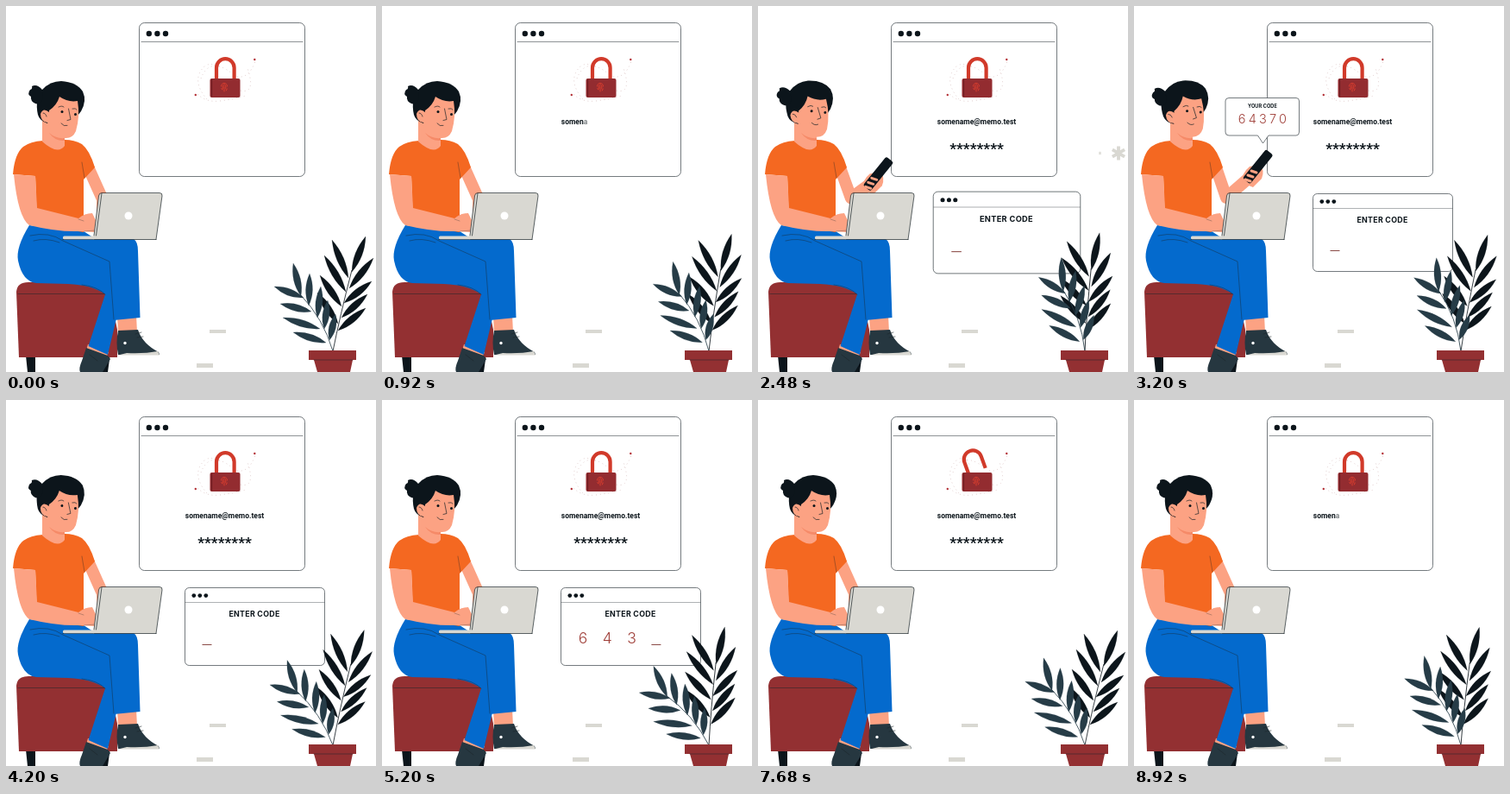
These frames come from a looping animation (429 by 424 pixels, 8960 ms). An HTML page:

```html
<!DOCTYPE html>
<html lang="en">
<head>
<meta charset="utf-8">
<title>Two-step sign-in</title>
<style>
html, body { margin: 0; width: 100%; height: 100%; overflow: hidden; background: #fff; }
svg { display: block; width: 100vw; height: 100vh; }
text { text-anchor: middle; }
.line { fill: none; stroke: #1b2429; stroke-width: .7; stroke-linecap: round; stroke-linejoin: round; }
.panel { fill: #fff; stroke: #3a4348; stroke-width: .7; }
.ink { fill: #0c151b; }
.skin { fill: #fca283; }
.shirt { fill: #f46821; }
.jeans { fill: #046acd; }
.maroon { fill: #933032; }
.grey { fill: #d9d8d2; }
.shoe { fill: #263740; }
.bold { font-family: Inter, sans-serif; font-weight: 700; fill: #0c151b; }
.digits { font-family: Inter, sans-serif; font-weight: 300; fill: #a0403a; }
.login { font-family: Roboto, sans-serif; font-weight: 700; fill: #0c151b; }
</style>
</head>
<body>
<svg viewBox="0 0 429 424" preserveAspectRatio="none">
  <!-- floor marks -->
  <path class="grey" d="M236 375h19v4h-19zM221 414h19v5h-19z"/>

  <!-- browser window -->
  <rect class="panel" x="154.5" y="19.5" width="192" height="178" rx="6"/>
  <path class="line" d="M157 41.5H344" stroke-opacity=".7"/>
  <g class="ink"><circle cx="165.8" cy="32" r="3.2"/><circle cx="175.4" cy="32" r="3.2"/><circle cx="185" cy="32" r="3.2"/></g>
  <path fill="none" stroke="#b98a8a" stroke-width=".6" stroke-dasharray=".7 4" d="M233 108Q214 86 230 70Q242 62 246 78M268 82Q282 84 289 64M272 98Q290 102 280 72M222 102Q232 112 248 110T278 104M226 84Q236 58 262 78"/>
  <g fill="#b5343a"><circle cx="288.3" cy="62" r="1.2"/><circle cx="219.8" cy="103" r="1.2"/></g>
  <path id="shackle" fill="none" stroke="#d13a2a" stroke-width="4.2" d="M244 86V71.500a10.300 10.300 0 0 1 20.600 0V86"/>
  <rect x="236.500" y="84" width="35" height="22" rx="2" fill="#932c30"/>
  <path fill="none" stroke="#64181e" stroke-width=".9" d="M238.600 85V105"/>
  <path fill="none" stroke="#e0402f" stroke-width=".9" stroke-linecap="round" d="M249.500 93c0-5 7-5 7 0M251.300 96v-3c0-2.600 3.500-2.600 3.500 0v3M253 93v6M249.800 95.500l1 1.500M256.300 96l-1 2"/>
  <g id="login">
    <text id="mail" class="login" x="253.500" y="137" font-size="8.500"></text>
    <text id="pass" class="login" x="253.500" y="170.800" font-size="17.300"></text>
  </g>
  <g id="stars" fill="none" stroke="#d9d8d2" stroke-width="4.300"></g>

  <!-- code entry window -->
  <g id="entry">
    <rect class="panel" x="207.500" y="217.500" width="162" height="90" rx="5"/>
    <path class="line" d="M208 234.500H369" stroke-opacity=".5"/>
    <g class="ink"><circle cx="217.800" cy="226.600" r="2.400"/><circle cx="224.800" cy="226.600" r="2.400"/><circle cx="231.800" cy="226.600" r="2.400"/></g>
    <text class="bold" x="288" y="250.700" font-size="8.800" letter-spacing=".3">ENTER CODE</text>
    <g id="slots" class="digits" font-size="17.500"></g>
    <path id="caret" stroke="#8a4a46" d="M-5.500 283.500h11"/>
  </g>

  <!-- stool -->
  <path class="ink" d="M23 405h11v19h-9zM108 402h13l-3 22h-8z"/>
  <path class="maroon" d="M12 331Q13 320 26 320H118L129 375V407H15Z"/>
  <path class="line" d="M14 333.500H114" stroke-opacity=".7"/>

  <!-- legs and shoes -->
  <path class="skin" d="M95 392L119 401L114 412L92 402ZM129 358H151L152 378L130 380Z"/>
  <path class="shoe" d="M93 396L118 405L121 409L112 424H86Q84 420 88 411ZM130 376L153 375Q158 391 177 401L178 404H130Q127 390 130 376Z"/>
  <path class="grey" d="M140 402Q160 403 176 400L178 404.500H130Z"/>
  <path class="line" d="M150 380l7-2M152 384l7-1M97 404l9 7" stroke-opacity=".8"/>
  <circle cx="138" cy="390.500" r="1.700" fill="#fff"/>
  <path class="jeans" d="M27 254L90 261L104 270H148Q153 273 153 284L155.500 361L125 364L124 330L128 362L118 404L95.500 394L115 334Q100 323 72 322L35 321Q19 319 14 295Q11 280 27 254Z"/>
  <path class="line" stroke-opacity=".6" d="M28 266Q50 261 66 272L120 296L125 363M32 272Q46 268 62 274M115 334Q106 325 88 323"/>

  <!-- far arm and phone -->
  <path id="arm" fill="none" stroke="#fca283" stroke-width="14" stroke-linejoin="round" stroke-linecap="round"/>
  <g id="phone">
    <path class="skin" d="M-13 13Q-15 2-5-6L7-8Q13-2 9 8L-1 18Z"/>
    <rect x="-5.500" y="-29" width="11" height="43" rx="2.500" transform="rotate(39)" fill="#0c151b"/>
    <path fill="none" stroke="#fca283" stroke-width="3" stroke-linecap="round" d="M-7 4l6 2M-3-1l6 2M-10 9l6 2"/>
  </g>

  <!-- torso -->
  <path class="shirt" d="M43 156Q28 157 20 163Q10 171 8 195L34 197L36 254L90 262V201L103 187Q97 167 88 160Q79 155 68 155Z"/>
  <path class="line" d="M88 181L91 199" stroke-opacity=".5"/>
  <path class="skin" d="M42 130L68 145V162Q60 173 42 157Z"/>
  <path fill="#f58a68" d="M50 147Q58 154 68 153V156Q57 157 50 147Z"/>

  <!-- head -->
  <g id="head">
    <path class="ink" d="M37 126Q33 108 42 97Q51 87 64 87Q82 88 89 99Q94 110 87 122L83 127L48 136Q39 133 37 126Z"/>
    <path class="ink" d="M42 97Q36 90 30 93Q31 96 28 97Q24 102 29 105Q28 110 34 113Q40 115 43 107Z"/>
    <path class="skin" d="M50 121Q59 115 62 105Q72 112 83 110Q86 128 81 145Q77 154 68 153Q54 150 48 135Q40 134 40 125Q43 117 50 123Z"/>
    <path class="line" d="M61 117q4-2 6 0M77 119q4-1 5 1M72.500 119L75 131.500l-4 1M64 136q3 4 7 2.500M43 124q3 0 4 4"/>
    <circle class="ink" cx="65" cy="122.500" r="1.500"/><circle class="ink" cx="80.500" cy="125.500" r="1.500"/>
  </g>

  <!-- near arm and laptop -->
  <path class="skin" d="M9 195L34 197L36 234L84 246Q91 240 100 240L105 250L103 262L86 261Q60 262 27 254Q14 245 9 195Z"/>
  <path class="line" stroke-opacity=".4" d="M84 247L90 249M91 261L103 260"/>
  <path class="grey" d="M111 217H179Q181.500 217 181 220L174 270.500H101L107.500 220Q108 217 111 217Z"/>
  <path class="line" d="M174 270.500L181 220Q181.500 216.500 178 216.500H111Q108 216.500 107.500 220L102 266M111 217L104.500 266M66 270.500H174"/>
  <rect class="grey" x="66" y="266.500" width="37" height="3.800" rx="1.500"/>
  <circle cx="142" cy="243" r="4.500" fill="#fff"/>

  <!-- message bubble -->
  <g id="bubble">
    <path class="panel" d="M110 106.500H188Q191.500 106.500 191.500 110V146Q191.500 150 188 150H156L149.500 159L143.500 150H110Q106 150 106 146V110Q106 106.500 110 106.500Z"/>
    <text class="bold" x="149" y="117.800" font-size="5.600" letter-spacing=".1">YOUR CODE</text>
    <text class="digits" x="150.500" y="136" font-size="14.500" letter-spacing="3.200">64370</text>
  </g>

  <!-- plant -->
  <g id="right" fill="#0c151b" stroke="#0c151b"><path fill="none" stroke-width=".8" d="M379 400Q387 360 401 306"/></g>
  <g id="left" fill="#263c47" stroke="#263c47"><path fill="none" stroke-width=".8" d="M379 400Q368 362 341 334"/></g>
  <path class="maroon" d="M351 399h55v11h-55zM357 410h45l-3 14h-38z"/>
  <path class="line" d="M357 410H402" stroke-opacity=".7"/>
</svg>
<script>
const LOOP = 8.96, CYCLE = 8;
const CODE = '64370';
const $ = id => document.getElementById(id);
const clamp = x => Math.min(1, Math.max(0, x));
const ramp = (t, a, b) => clamp((t - a) / (b - a));
const smooth = x => (1 - Math.cos(Math.PI * x)) / 2;
const mix = (a, b, k) => a + (b - a) * k;
const backIn = x => x * x * (2.6 * x - 1.6);
const pop = (t, start, end) =>
  t < end ? 1 - backIn(1 - ramp(t, start, start + .4)) : 1 - backIn(ramp(t, end, end + .4));
const scaleAt = (x, y, s) => `translate(${x} ${y}) scale(${Math.max(0, s)}) translate(${-x} ${-y})`;

function add(parent, tag, attrs, text = '') {
  const el = document.createElementNS('http://www.w3.org/2000/svg', tag);
  for (const k in attrs) el.setAttribute(k, attrs[k]);
  el.textContent = text;
  parent.append(el);
  return el;
}
const set = (id, k, v) => $(id).setAttribute(k, v);

// Each leaf runs from its tip to the point where it meets the stem.
function leaves(id, list) {
  for (const [x, y, bx, by] of list) {
    const dx = bx - x, dy = by - y, len = Math.hypot(dx, dy);
    const nx = -dy / len * 8, ny = dx / len * 8;
    const mx = x + dx * .52, my = y + dy * .52;
    add($(id), 'path', {
      'stroke-width': .2,
      d: `M${x} ${y}Q${mx + nx} ${my + ny} ${bx} ${by}Q${mx - nx} ${my - ny} ${x} ${y}`
    });
  }
}
leaves('right', [
  [417, 267, 401, 308], [378, 271, 397, 315], [369, 289, 394, 331], [364, 312, 389, 348], [361, 332, 385, 368],
  [426, 292, 398, 327], [424, 319, 392, 344], [419, 334, 389, 361], [417, 350, 385, 376]
]);
leaves('left', [
  [333, 298, 342, 336], [311, 325, 345, 338], [318, 345, 354, 354], [321, 361, 364, 374], [333, 378, 371, 390],
  [352, 310, 351, 347], [365, 325, 361, 361], [373, 341, 369, 374], [382, 357, 375, 387]
]);

const letters = (id, s) => [...s].map(c => add($(id), 'tspan', {}, c));
const mail = letters('mail', 'somename@memo.test');
const pass = letters('pass', '********');
const slots = [...CODE].map((c, i) => add($('slots'), 'text', { x: 233 + i * 28.3, y: 281.7 }, c));
const stars = [376, 396.5, 418].map(x => {
  const el = add($('stars'), 'path', { d: 'M0-9V9M-8-4.600L8 4.600M-8 4.600L8-4.600' });
  return { el, x };
});

const type = (list, t, start, step) =>
  list.forEach((el, i) => el.setAttribute('fill-opacity', clamp((t - start) / step - i)));

function leftSway(t) {
  if (t < 2.9) return mix(0, 10.7, smooth(t / 2.9));
  if (t < 5) return mix(10.7, -10.8, smooth((t - 2.9) / 2.1));
  return mix(-10.8, 2, smooth((t - 5) / 3.96));
}

function draw(now) {
  const time = now / 1000 % LOOP, t = time % CYCLE;

  set('right', 'transform', `rotate(${5.4 * (Math.cos(time / 3.88 * 2 * Math.PI) - 1)} 379 400)`);
  set('left', 'transform', `rotate(${leftSway(time)} 379 400)`);

  type(mail, t, .7, .04);
  type(pass, t, 1.42, .04);
  set('login', 'opacity', 1 - ramp(t, 7.75, 7.95));
  stars.forEach(({ el, x }, i) =>
    el.setAttribute('transform', `translate(${x} 170.500) scale(${Math.max(0, pop(t, 1.15 + i * .1, 2 + i * .1))})`));

  const open = smooth(ramp(t, 6.1, 6.4)) - smooth(ramp(t, 7.75, 8));
  set('shackle', 'transform', `rotate(${-20 * open} 244 85)`);

  const raise = smooth(ramp(t, 2.15, 2.6)) - smooth(ramp(t, 3.85, 4.25));
  const hx = mix(112, 138, raise), hy = mix(246, 195, raise);
  set('arm', 'd', `M94 184L${mix(112, 107, raise)} ${mix(224, 222, raise)}L${hx} ${hy}`);
  set('phone', 'transform', `translate(${hx + 1} ${hy - 3})`);
  set('phone', 'opacity', raise > .05 ? 1 : 0);
  set('head', 'transform', `rotate(${-6 * raise} 55 155)`);
  set('bubble', 'transform', scaleAt(149.5, 159, pop(t, 2.5, 3.6)));

  set('entry', 'transform', scaleAt(288.5, 262.5, pop(t, 2.3, 6.4)));
  const typed = Math.floor(clamp((t - 3.95) / 2) * 5);
  slots.forEach((el, i) => el.setAttribute('opacity', i < typed ? 1 : 0));
  set('caret', 'transform', `translate(${233 + typed * 28.3} 0)`);
  set('caret', 'opacity', typed < 5 ? 1 : 0);
}

const start = performance.now();
(function frame() {
  draw(performance.now() - start);
  requestAnimationFrame(frame);
})();
</script>
</body>
</html>
```
